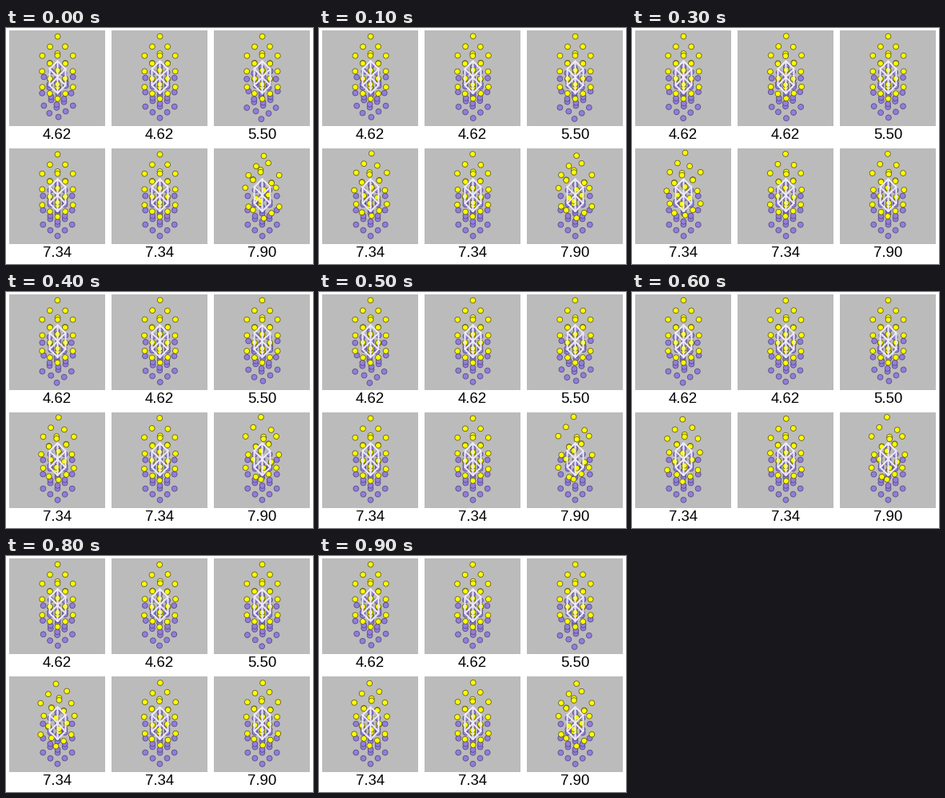
These frames come from a looping animation (384x296 px, 1 s). A matplotlib script:

```python
import itertools

import matplotlib.pyplot as plt
import numpy as np
from matplotlib.animation import FuncAnimation
from matplotlib.patches import Rectangle

WIDTH, HEIGHT, DPI = 384, 296, 100
FRAMES = 10
PX = 72 / DPI
YELLOW, YELLOW_EDGE = "#ffff00", "#5f5c1e"
PURPLE, PURPLE_EDGE = "#937ddb", "#544a80"

# label, yellow swing, purple swing, phase
MODES = [
    ("4.62", (0.1, 0.1), (1.1, -1.2), np.pi / 2),
    ("4.62", (0.4, -0.4), (0.5, 0.4), 0),
    ("5.50", (0.1, 0.1), (-1.1, 1.4), np.pi / 2),
    ("7.34", (2.1, -2.0), (0.1, 0.1), 0),
    ("7.34", (-0.5, -0.6), (0.1, 0.1), 0),
    ("7.90", (2.0, 2.0), (0.1, 0.1), np.pi / 2),
]

# A 3 x 3 x 3 crystal: layers from the bottom up, rows from back to front.
layer, i, j = np.array(list(itertools.product((2, 1, 0), range(3), range(3)))).T
row = i + j
direction = (-1.0) ** (i + layer)

# Rows and layers draw closer together with perspective.
yellow_sites = np.column_stack([
    9.6 * (i - j),
    10 + 21.5 * layer + row * (13.6 - 0.75 * row - 0.9 * layer)])
purple_sites = np.column_stack([
    9.1 * (i - j),
    47.9 + 18 * layer + 7.1 * row])
sites = np.vstack([purple_sites, yellow_sites]) + 0.5


def per_atom(purple, yellow):
    return [purple] * len(purple_sites) + [yellow] * len(yellow_sites)


def cell_edges():
    """Edges of the projected unit cell, spanned by three vectors."""
    basis = np.array([(10, 9.9), (-10, 9.9), (0, 20.5)])
    origin = np.array([0.5, 41.5])
    for axis in range(3):
        others = np.delete(basis, axis, axis=0)
        for corner in itertools.product((0, 1), repeat=2):
            start = origin + corner @ others
            yield np.array([start, start + basis[axis]])


fig = plt.figure(figsize=(WIDTH / DPI, HEIGHT / DPI), dpi=DPI, facecolor="white")
ax = fig.add_axes([0, 0, 1, 1])
ax.set(xlim=(0, WIDTH), ylim=(HEIGHT, 0))
ax.axis("off")

panels = []
for k, (label, yellow_swing, purple_swing, phase) in enumerate(MODES):
    center = np.array([64 + 128 * (k % 3), 148 * (k // 3)])
    ax.add_patch(Rectangle(center + (-60, 3), 120, 120, fc="#bbbbbb", lw=0))
    ax.text(center[0], center[1] + 139, label, ha="center", va="baseline",
            family="Liberation Sans", size=18.7 * PX, color="black")
    atoms = ax.scatter(*(center + sites).T, s=(6.8 * PX) ** 2,
                       c=per_atom(PURPLE, YELLOW), lw=0.8 * PX, zorder=2,
                       edgecolors=per_atom(PURPLE_EDGE, YELLOW_EDGE))
    for edge in cell_edges():
        ax.plot(*(edge + center).T, color="#eeeaf8", lw=2 * PX, zorder=3,
                solid_capstyle="round", snap=False)
    swing = np.array(per_atom(purple_swing, yellow_swing))
    panels.append((atoms, center, swing * np.tile(direction, 2)[:, None], phase))


def update(frame):
    for atoms, center, swing, phase in panels:
        wave = np.sin(2 * np.pi * frame / FRAMES + phase)
        atoms.set_offsets(center + sites + wave * swing)
    return [panel[0] for panel in panels]


anim = FuncAnimation(fig, update, frames=FRAMES, interval=100, repeat=True)
plt.show()
```
